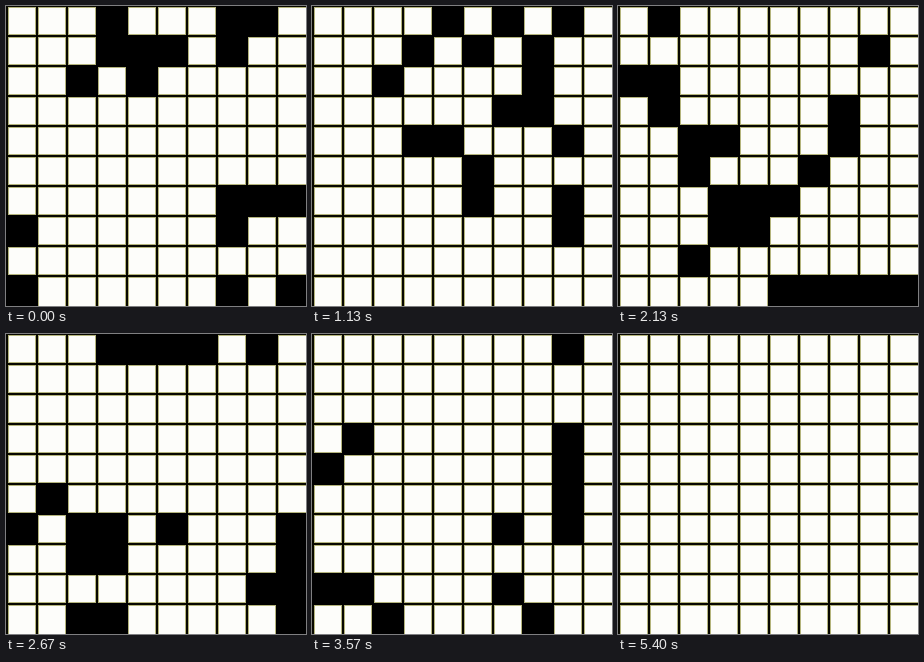
Recreate the animation shown at these times as an HTML page. Size 300 px wide and 300 px high, loop 5430 ms.

```html
<!DOCTYPE html>
<html lang="en">
<head>
<meta charset="utf-8">
<title>Life on a torus</title>
<style>
  html, body { margin: 0; width: 100%; height: 100%; overflow: hidden; background: #fdfdfa; }
  svg { display: block; width: 100vw; height: 100vh; }
</style>
</head>
<body>
<svg viewBox="0 0 300 300" shape-rendering="crispEdges" fill="none">
  <rect width="300" height="300" fill="#fdfdfa"/>
  <path class="grid" stroke="#b4b47c" stroke-width="4"/>
  <path class="grid" stroke="#080800" stroke-width="2"/>
  <path id="cells" fill="#000"/>
</svg>
<script>
const SIZE = 10, CELL = 30;
const LOOP = 5430, STEP = 100, LEAD = 100 / 3;
const SEED = [
  '...#...##.',
  '...###.#..',
  '..#.#.....',
  '..........',
  '..........',
  '..........',
  '.......###',
  '#......#..',
  '..........',
  '#......#.#'
];

const wrap = n => (n + SIZE) % SIZE;

// Conway's rules; the sum includes the cell itself.
function evolve(board) {
  return board.map((row, r) => row.map((alive, c) => {
    let sum = 0;
    for (let dr = -1; dr <= 1; dr++)
      for (let dc = -1; dc <= 1; dc++)
        sum += board[wrap(r + dr)][wrap(c + dc)];
    return sum === 3 || (sum === 4 && alive) ? 1 : 0;
  }));
}

function boardPath(board) {
  let path = '';
  board.forEach((row, r) => row.forEach((alive, c) => {
    if (alive) path += `M${c * CELL} ${r * CELL - 1}h32v32h-32z`;
  }));
  return path;
}

const generations = [];
let board = SEED.map(row => [...row].map(ch => ch === '#' ? 1 : 0));
for (let t = 0; t <= LOOP + STEP; t += STEP) {
  generations.push(boardPath(board));
  board = evolve(board);
}

let lines = '';
for (let i = 0; i < SIZE; i++)
  lines += `M${i * CELL + 1} 0V300M0 ${i * CELL}H300`;
document.querySelectorAll('.grid').forEach(path => path.setAttribute('d', lines));

const cells = document.getElementById('cells');
let shown = -1;

function draw(time) {
  const index = Math.floor((time % LOOP + LEAD + 1) / STEP);
  if (index === shown) return;
  shown = index;
  cells.setAttribute('d', generations[index]);
}

const start = performance.now();
function tick() {
  draw(performance.now() - start);
  requestAnimationFrame(tick);
}
draw(0);
requestAnimationFrame(tick);
</script>
</body>
</html>
```
